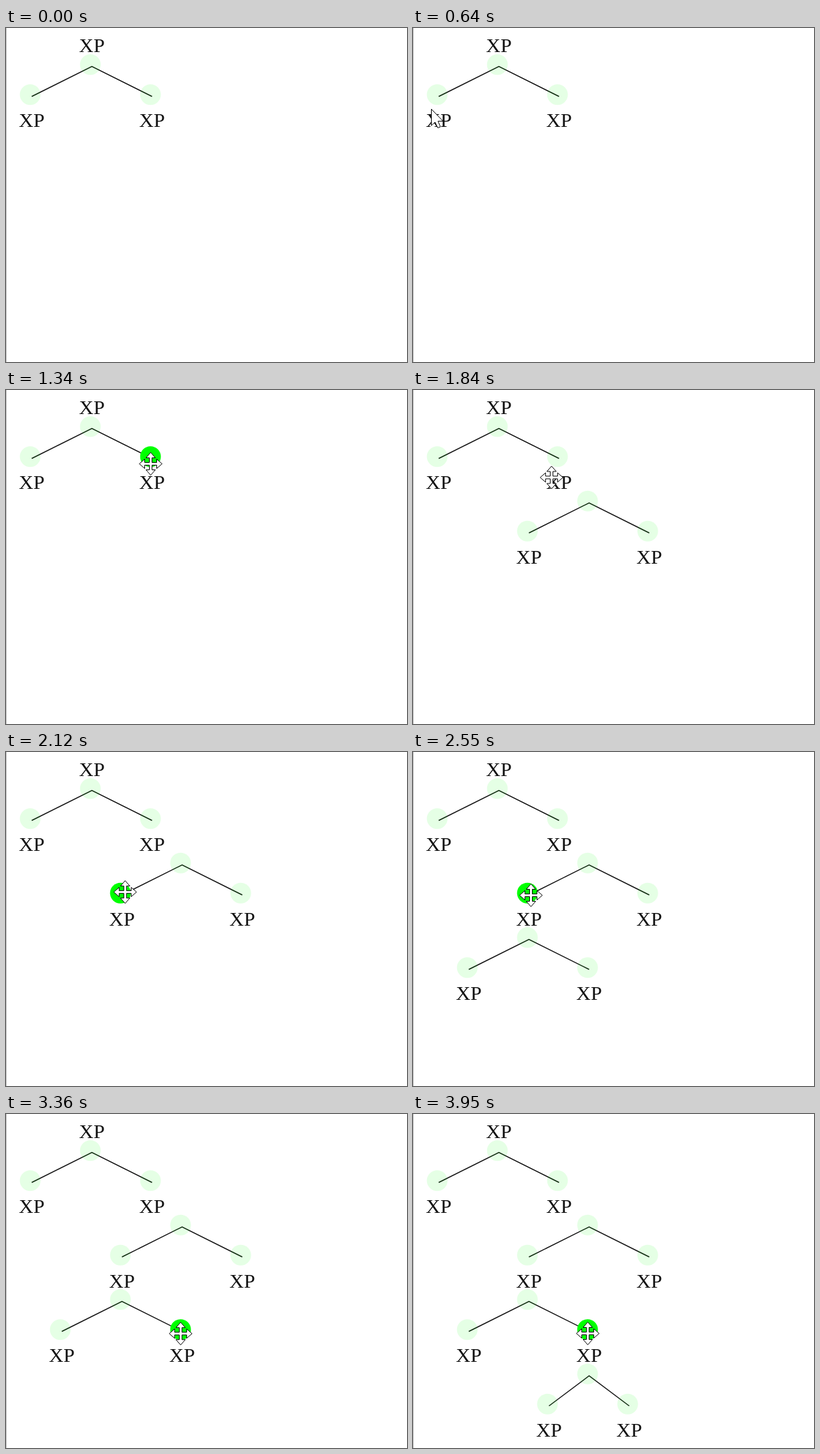
An HTML page for the animation above (4.27 s loop, 600 by 500 pixels).

```html
<!DOCTYPE html>
<html lang="en">
<head>
<meta charset="utf-8">
<title>Growing a syntax tree</title>
<style>
  html, body { margin: 0; width: 100%; height: 100%; overflow: hidden; background: #fff; }
  svg { display: block; }
  text { font: 30px "Liberation Serif", serif; text-anchor: middle; fill: #111; }
  polyline { fill: none; stroke: #111; stroke-width: 1.5; }
  circle { fill: #0f0; opacity: .1; }
  circle.hover { opacity: 1; }
  #cursor path { fill: #fff; stroke: #000; }
</style>
</head>
<body>
<svg width="600" height="500" viewBox="0 0 600 500">
  <rect width="1" height="500" fill="#c0c0c0"/>
  <text x="128.5" y="36">XP</text>
  <g id="trees"></g>
  <g id="cursor">
    <path id="arrow" d="M0 0V24.5L5.5 19.5L9.5 28L13.5 26.5L10 18H17.5Z"/>
    <path id="move"/>
  </g>
</svg>
<script>
const LOOP = 4270, ENTER = 380, ARROW_UNTIL = 660;
const LEVEL = 111.5, DROP = 45, RADIUS = 15.5, HOVER_LAG = 60;
const $ = id => document.getElementById(id);

// The pointer eases to each stop and rests where two stops agree
const stops = [
  { t: ENTER, x: 2, y: 121.5 },
  { t: 640, x: 26.5, y: 121.5 },
  { t: 900, x: 158.5, y: 118.5 },
  { t: 1340, x: 216.5, y: 110.5 },
  { t: 1760, x: 216.5, y: 110.5 },
  { t: 1840, x: 207.5, y: 130.5 },
  { t: 2210, x: 176.5, y: 214.5 },
  { t: 2630, x: 176.5, y: 214.5 },
  { t: 2870, x: 180, y: 287 },
  { t: 2930, x: 213.5, y: 313.5 },
  { t: 3110, x: 254, y: 338.5 },
  { t: 3410, x: 261.5, y: 328.5 },
];

function pointerAt(t) {
  const next = stops.findIndex(s => s.t > t);
  if (next < 1) return next ? stops.at(-1) : stops[0];
  const a = stops[next - 1], b = stops[next];
  const k = (t - a.t) / (b.t - a.t), eased = k * (2 - k);
  return { x: a.x + (b.x - a.x) * eased, y: a.y + (b.y - a.y) * eased };
}

// Four-way cursor: one arm turned by quarter circles
const turn = ([x, y], q) => q ? turn([-y, x], q - 1) : [x, y];
const arm = [[0, -17], [7, -9], [2, -9], [2, -2], [9, -2], [9, -7]];
$("move").setAttribute("d",
  "M" + [0, 1, 2, 3].flatMap(q => arm.map(p => turn(p, q))).join("L") + "Z");

function makeTree(level, x, halfWidth, born) {
  const y = 57.5 + LEVEL * level, left = x - halfWidth, right = x + halfWidth;
  const nodes = [[left, y + DROP], [x, y], [right, y + DROP]];
  const dots = nodes.map(([nx, ny]) => `<circle cx="${nx - 2.3}" cy="${ny - 2.8}" r="${RADIUS}"/>`);
  const labels = [left, right].map(lx => `<text x="${lx}" y="${y + 90.5}">XP</text>`);
  $("trees").insertAdjacentHTML("beforeend",
    `<g><polyline points="${nodes.join(" ")}"/>${dots.join("")}${labels.join("")}</g>`);
  return { view: $("trees").lastElementChild, born };
}

const trees = [
  makeTree(0, 128.5, 90, 0),
  makeTree(1, 263.5, 90, 1520),
  makeTree(2, 173.5, 90, 2420),
  makeTree(3, 263.5, 60, 3800),
];
const circles = [...document.querySelectorAll("circle")];

const show = (el, on) => el.setAttribute("visibility", on ? "visible" : "hidden");

function draw() {
  const t = performance.now() % LOOP;
  const { x, y } = pointerAt(t), felt = pointerAt(t - HOVER_LAG);
  for (const { view, born } of trees) show(view, t >= born);
  for (const c of circles) {
    const distance = Math.hypot(c.cx.baseVal.value - felt.x, c.cy.baseVal.value - felt.y);
    c.classList.toggle("hover", distance < RADIUS);
  }
  $("cursor").setAttribute("transform", `translate(${x} ${y})`);
  show($("arrow"), t >= ENTER && t < ARROW_UNTIL);
  show($("move"), t >= ARROW_UNTIL);
  requestAnimationFrame(draw);
}
draw();
</script>
</body>
</html>
```
